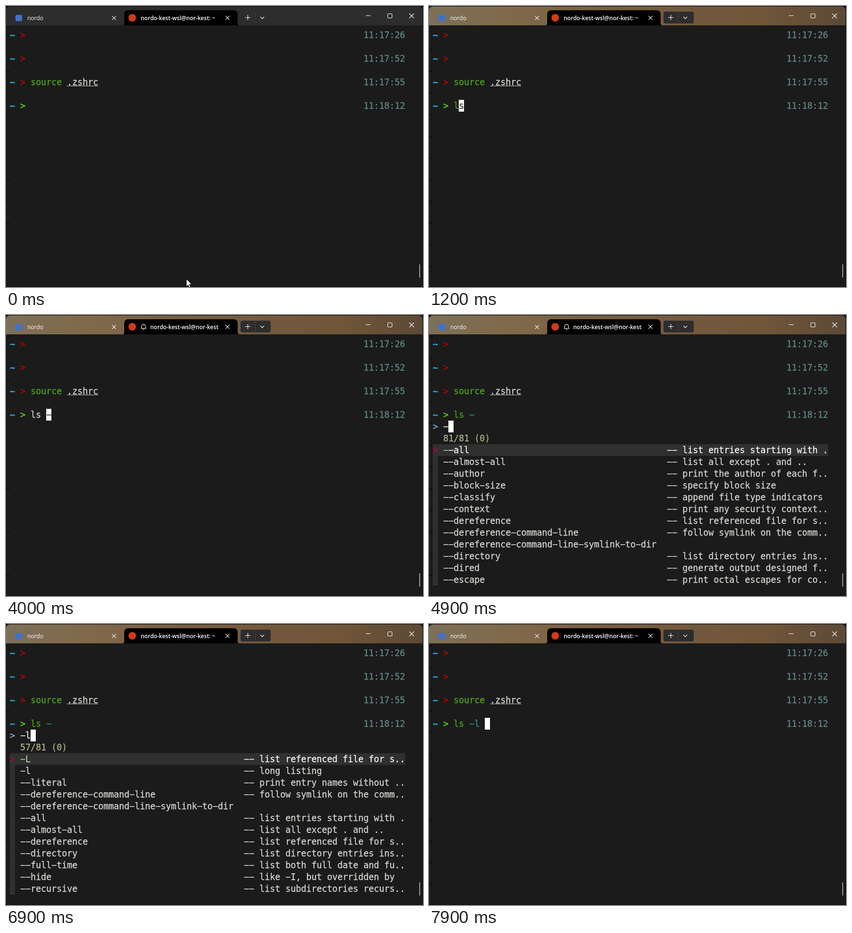
An HTML page with a canvas for the animation above (8000 ms loop, 882x596 px).

```html
<!DOCTYPE html>
<html lang="en">
<head>
<meta charset="utf-8">
<title>Terminal completion</title>
<style>
html, body { margin: 0; width: 100%; height: 100%; overflow: hidden; background: #000; }
canvas { display: block; }
</style>
</head>
<body>
<canvas id="stage" width="882" height="596"></canvas>
<script>
const ctx = document.getElementById('stage').getContext('2d');
const LOOP = 8000, LEFT = 8, TOP = 49, COL = 11, ROW = 25;
const MONO = '14pt "DejaVu Sans Mono", monospace';
const FG = '#d3d7cf', GREEN = '#4ea512', TEAL = '#2c958f', RAISED = '#303030', BG = '#1b1b1b';
const USER = 'nordo', TITLE = 'nordo-kest-wsl@nor-kest';

// Times at which the session changes state
const T = {
  focus: 600, l: 1100, s: 1200, ls: 1300, space: 1500, files: 2000, cancel: 3000,
  bell: 3700, dash: 4000, dashDone: 4100, options: 4600, bellEnd: 5700, filter: 5900, accept: 7500
};

const ALL = '--all|list entries starting with .';
const ALMOST = '--almost-all|list all except . and ..';
const DEREF = '--dereference|list referenced file for s..';
const DEREF_CMD = '--dereference-command-line|follow symlink on the comm..';
const DEREF_DIR = '--dereference-command-line-symlink-to-dir';
const DIRECTORY = '--directory|list directory entries ins..';

const FILES = ['code/', 'test.txt', 'test2.txt'];
const OPTIONS = [
  ALL, ALMOST, '--author|print the author of each f..', '--block-size|specify block size',
  '--classify|append file type indicators', '--context|print any security context..',
  DEREF, DEREF_CMD, DEREF_DIR, DIRECTORY,
  '--dired|generate output designed f..', '--escape|print octal escapes for co..'
];
const FILTERED = [
  '-L|list referenced file for s..', '-l|long listing', '--literal|print entry names without ..',
  DEREF_CMD, DEREF_DIR, ALL, ALMOST, DEREF, DIRECTORY,
  '--full-time|list both full date and fu..', '--hide|like -I, but overridden by',
  '--recursive|list subdirectories recurs..'
];

function rect(x, y, w, h, color) {
  ctx.fillStyle = color;
  ctx.fillRect(x, y, w, h);
}

function rounded(x, y, w, h, radius, color) {
  ctx.fillStyle = color;
  ctx.beginPath();
  ctx.roundRect(x, y, w, h, radius);
  ctx.fill();
}

function line(color, ...points) {
  ctx.strokeStyle = color;
  ctx.lineWidth = 1.1;
  ctx.beginPath();
  for (let i = 0; i < points.length; i += 2) ctx.lineTo(points[i], points[i + 1]);
  ctx.stroke();
}

function cross(x, y, r) {
  line('#fff', x - r, y - r, x + r, y + r);
  line('#fff', x + r, y - r, x - r, y + r);
}

function label(text, x, weight) {
  ctx.font = `${weight} 12px "Open Sans", "Noto Sans", sans-serif`;
  ctx.fillStyle = '#fff';
  ctx.fillText(text, x, 30);
}

const colX = col => LEFT + col * COL;
const rowY = row => TOP + row * ROW;

// Hyphens are drawn as minus signs, which nearly fill a cell;
// a hairline stroke gives the weight of hinted terminal text
function write(text, col, row, color = FG, bold = false) {
  ctx.font = (bold ? 'bold ' : '') + MONO;
  ctx.fillStyle = ctx.strokeStyle = color;
  ctx.lineWidth = 0.3;
  ctx.lineJoin = 'round';
  [...text.replaceAll('-', '\u2212')].forEach((ch, i) => {
    ctx.fillText(ch, colX(col + i), rowY(row) + 19);
    ctx.strokeText(ch, colX(col + i), rowY(row) + 19);
  });
}

function block(col, row, under = '') {
  rect(colX(col), rowY(row), COL, ROW, '#fff');
  write(under, col, row, '#333');
}

function prompt(row, time, arrow) {
  write('~', 0, row, '#20aee6', true);
  write('>', 2, row, arrow);
  write(time, 68, row, '#5f8787');
}

function drawBell() {
  line('#fff', 285.5, 28.5, 296.5, 28.5, 295, 26, 295, 23, 293.5, 20.5, 291, 19.5,
    288.5, 20.5, 287, 23, 287, 26, 285.5, 28.5);
  line('#fff', 289.5, 30, 291, 31, 292.5, 30);
}

function drawActiveTab() {
  rounded(250, 9, 240, 32, [8, 8, 0, 0], '#000');
  ctx.beginPath();
  ctx.moveTo(246, 41);
  ctx.quadraticCurveTo(250, 41, 250, 37);
  ctx.lineTo(490, 37);
  ctx.quadraticCurveTo(490, 41, 494, 41);
  ctx.fill();
}

function drawTitleBar(t) {
  const focused = t >= T.focus, bell = t >= T.bell && t < T.bellEnd;
  let bar = '#2d2d2d';
  if (focused) {
    bar = ctx.createLinearGradient(0, 0, 882, 0);
    ['#7d7058', '#80694a', '#795f43', '#735a3f', '#705639', '#5c4936']
      .forEach((color, i) => bar.addColorStop(i / 5, color));
  }
  rounded(0, 1, 881, 40, [8, 8, 0, 0], bar);

  drawActiveTab();
  rounded(20, 19, 14, 13, 2, '#3f72cc');
  rounded(259, 17, 16, 16, 8, '#d23a18');
  label(USER, 45, 400);
  if (bell) drawBell();
  label(bell ? TITLE : TITLE + ': ~', bell ? 305 : 285, 600);
  cross(228.5, 25.5, 4.2);
  cross(468.5, 25, 4.2);

  if (focused) rounded(496, 12, 64, 25, 4, '#2d2d2d');
  rect(527, 13, 1, 23, focused ? '#454545' : '#3a3a3a');
  line('#fff', 506, 24.5, 517, 24.5);
  line('#fff', 511.5, 19, 511.5, 30);
  line('#fff', 538, 23, 542, 27, 546, 23);

  line('#fff', 761, 20.5, 771, 20.5);
  ctx.beginPath();
  ctx.roundRect(807.5, 16.5, 9, 9, 1.5);
  ctx.stroke();
  cross(858, 21, 5);
}

function drawMenu(items, count, query, matched) {
  const wide = items[0].includes('|');
  write('>', 0, 7, '#87afd7');
  write(query, 2, 7, '#eee');
  block(2 + query.length, 7);
  write(count, 2, 8, '#afaf87');
  rect(LEFT, rowY(9), COL, items.length * ROW, RAISED);
  rect(LEFT, rowY(9), (wide ? 76 : 7) * COL, ROW, RAISED);
  write('>', 0, 9, '#b8004c');
  items.forEach((item, i) => {
    const [name, about] = item.split('|'), color = i ? FG : '#f4f4f2';
    const hit = i ? 0 : matched;
    write(name.slice(0, hit), 2, 9, '#a2d09c');
    write(name.slice(hit), 2 + hit, 9 + i, color);
    if (about) write('-- ' + about, 45, 9 + i, color);
  });
}

function drawCommand(t) {
  const plain = t >= T.cancel && t < T.dashDone;
  if (t >= T.l) write(t < T.s ? 'l' : 'ls', 4, 6, plain ? FG : GREEN);
  if (t >= T.dash) write(t < T.accept ? '-' : '-l', 7, 6, TEAL);

  if (t >= T.files && t < T.cancel) return drawMenu(FILES, '3/3 (0)', '', 0);
  if (t >= T.options && t < T.filter) return drawMenu(OPTIONS, '81/81 (0)', '-', 1);
  if (t >= T.filter && t < T.accept) return drawMenu(FILTERED, '57/81 (0)', '-l', 2);

  if (t >= T.accept) block(10, 6);
  else if (t >= T.dashDone) block(8, 6);
  else if (t >= T.dash) block(7, 6, '-');
  else if (t >= T.space) block(7, 6);
  else if (t >= T.ls) block(6, 6);
  else if (t >= T.s) block(5, 6, 's');
  else if (t >= T.l) block(5, 6);
  else if (t >= T.focus) block(4, 6);
}

function drawPointer(t) {
  const y = 579 + Math.max(0, t - 100) * 0.09;
  if (y > 596) return;
  ctx.save();
  ctx.translate(381.5, y);
  ctx.beginPath();
  [[0, 0], [0, 16], [3.7, 12.6], [6.2, 18], [8.6, 17], [6.2, 11.6], [11, 11.3]]
    .forEach(p => ctx.lineTo(...p));
  ctx.closePath();
  ctx.fillStyle = '#fff';
  ctx.fill();
  ctx.lineWidth = 0.8;
  ctx.strokeStyle = '#000';
  ctx.stroke();
  ctx.restore();
}

function draw(t) {
  rect(0, 0, 882, 596, '#0c0c0c');
  rect(0, 41, 881, 554, BG);
  drawTitleBar(t);
  for (let y = 46; y < 560; y += 46) rect(0, y, 8, 1, '#000');

  prompt(0, '11:17:26', '#c80000');
  prompt(2, '11:17:52', '#c80000');
  prompt(4, '11:17:55', '#c80000');
  prompt(6, '11:18:12', '#5fe516');
  write('source', 4, 4, GREEN);
  write('.zshrc', 11, 4);
  rect(colX(11), 169, 6 * COL, 1, FG);

  drawCommand(t);
  rect(874, 548, 2, 28, '#9a9a9a');
  drawPointer(t);
}

const start = performance.now();
function tick() {
  draw((performance.now() - start) % LOOP);
  requestAnimationFrame(tick);
}
tick();
</script>
</body>
</html>
```
